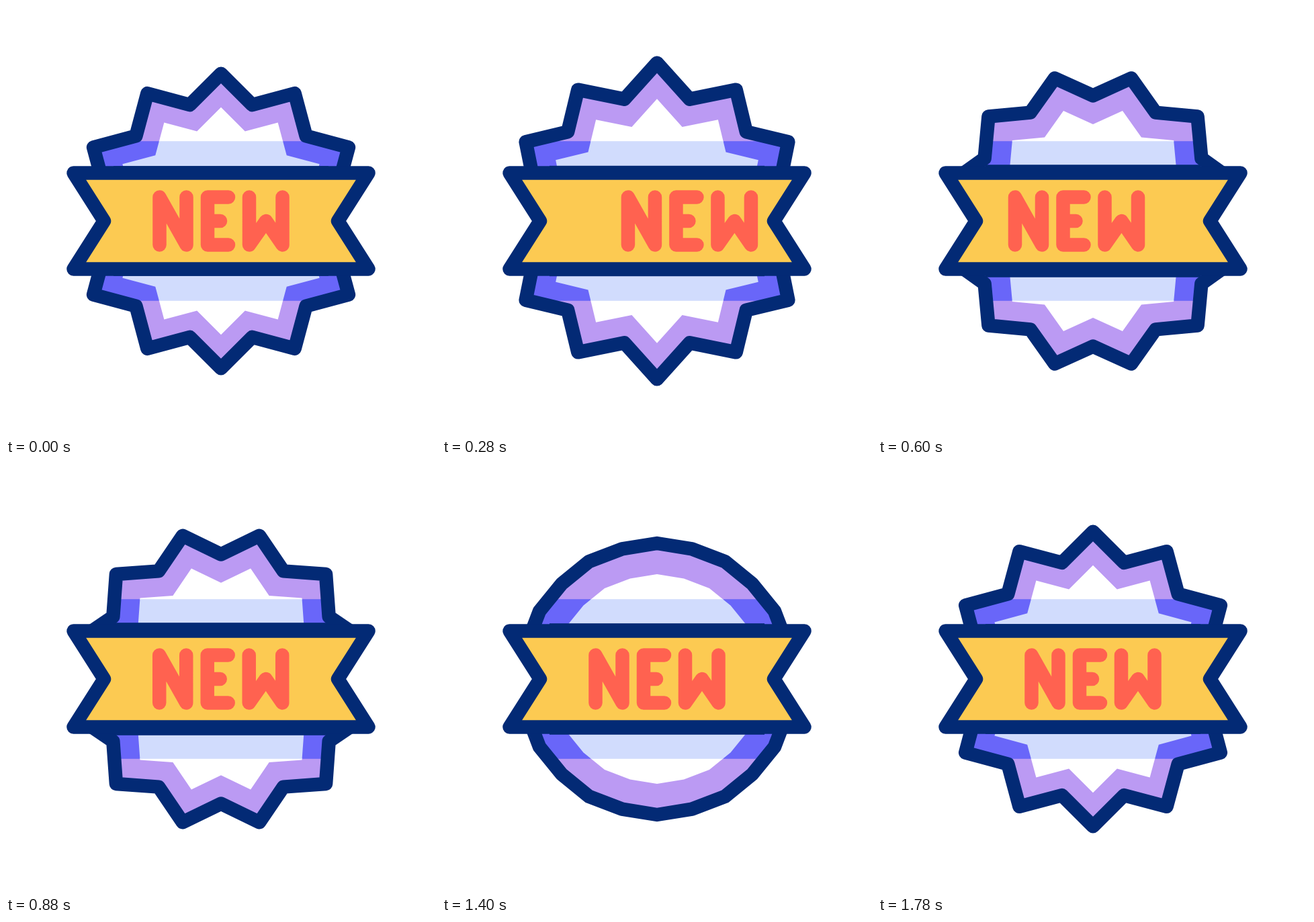
Write an HTML page with a canvas that moves like this. It is 640 px wide and 640 px high and loops after 1800 ms.

```html
<!DOCTYPE html>
<html lang="en">
<head>
<meta charset="utf-8">
<title>New badge</title>
<style>
  html, body { margin: 0; width: 100%; height: 100%; overflow: hidden; background: #fff; }
  canvas { display: block; width: 100vmin; height: 100vmin; }
</style>
</head>
<body>
<canvas id="stage" width="640" height="640"></canvas>
<script>
const ctx = document.getElementById('stage').getContext('2d');
const LOOP = 1800, MID = 320, LINE = 20.5, TOP = 248.4, STEP = Math.PI / 12;
const NAVY = '#032a75', LILAC = '#bb9af3', BLUE = '#6966f9',
      PALE = '#d1dcfd', YELLOW = '#fcca52', RED = '#ff6250';

// even / odd: radii of alternating vertices, kick: outward push of the spikes,
// lift: rise of the base line
const SPIKY = { even: 219.3, odd: 179, kick: 0, lift: 0 };
const BURST = { ...SPIKY, kick: 14.7 };
const TURNED = { even: 185.5, odd: 220.7, kick: 0, lift: 2 };
const ROUND = { even: 202, odd: 200.5, kick: 0, lift: 1 };

const mix = (a, b, k) => a + (b - a) * k;

// Smooth 0..1 progress from time a to time b
function ease(t, a, b) {
  const s = Math.min(1, Math.max(0, (t - a) / (b - a)));
  return s * s * (3 - 2 * s);
}

function blend(p, q, k) {
  const out = {};
  for (const key in p) out[key] = mix(p[key], q[key], k);
  return out;
}

function shapeAt(t) {
  let s = blend(SPIKY, BURST, ease(t, 0, 130));
  s = blend(s, TURNED, ease(t, 130, 640));
  s = blend(s, ROUND, ease(t, 1040, 1320));
  return blend(s, SPIKY, ease(t, 1420, LOOP));
}

// Swing right, back half as far to the left, then rest
function wordShift(t) {
  const swing = 49;
  return swing * (ease(t, 0, 300) - 1.5 * ease(t, 300, 600) + 0.5 * ease(t, 600, 900));
}

// Upper half of the star, from left to right around the centre
function outline({ even, odd, kick }) {
  const points = [];
  for (let i = -5; i <= 5; i++) {
    const spike = i % 2 === 0;
    const r = spike ? even : odd;
    const push = spike ? kick : 0;
    points.push([
      r * Math.sin(i * STEP) + push * Math.sign(i),
      -r * Math.cos(i * STEP) - push * (i ? 1 : 2)
    ]);
  }
  return points;
}

function trace(points, scale = 1) {
  ctx.beginPath();
  for (const [x, y] of points) ctx.lineTo(MID + x * scale, MID + y * scale);
}

// Area in one colour above the tinted band, another inside it
function banded(points, scale, upper, lower) {
  const edge = points[points.length - 1][0];
  ctx.save();
  trace([[-edge, 0], ...points, [edge, 0]], scale);
  ctx.clip();
  ctx.fillStyle = upper;
  ctx.fillRect(0, 0, 640, 202);
  ctx.fillStyle = lower;
  ctx.fillRect(0, 201.2, 640, 120);
  ctx.restore();
}

function halfBadge(points, lift) {
  ctx.save();
  ctx.beginPath();
  ctx.rect(0, 0, 640, TOP);
  ctx.clip();
  banded(points, 1, LILAC, BLUE);
  banded(points, 0.772, '#fff', PALE);
  ctx.strokeStyle = ctx.fillStyle = NAVY;
  trace(points);
  ctx.stroke();
  ctx.fillRect(160, 238.2 - lift, 320, 10);
  ctx.restore();
}

const ribbon = new Path2D(
  `M100.5 ${TOP}H539.5L494 320L539.5 391.4H100.5L146 320Z`);
const word = new Path2D(
  'M228.5 355.5V284.5L268.5 355.5V284.5' +
  'M331 284.5H300V355.5H331M300 320H319' +
  'M362 284.5V355.5L387 320L411.5 355.5V284.5');

function draw(t) {
  ctx.fillStyle = '#fff';
  ctx.fillRect(0, 0, 640, 640);
  ctx.lineWidth = LINE;
  ctx.lineJoin = ctx.lineCap = 'round';

  const shape = shapeAt(t), points = outline(shape);
  halfBadge(points, shape.lift);
  ctx.save();
  ctx.translate(0, 640);
  ctx.scale(1, -1);
  halfBadge(points, shape.lift);
  ctx.restore();

  ctx.fillStyle = YELLOW;
  ctx.fill(ribbon);
  ctx.strokeStyle = NAVY;
  ctx.stroke(ribbon);

  ctx.save();
  ctx.translate(wordShift(t), 0);
  ctx.strokeStyle = RED;
  ctx.stroke(word);
  ctx.restore();
}

const start = performance.now();
function tick() {
  draw((performance.now() - start) % LOOP);
  requestAnimationFrame(tick);
}
tick();
</script>
</body>
</html>
```
